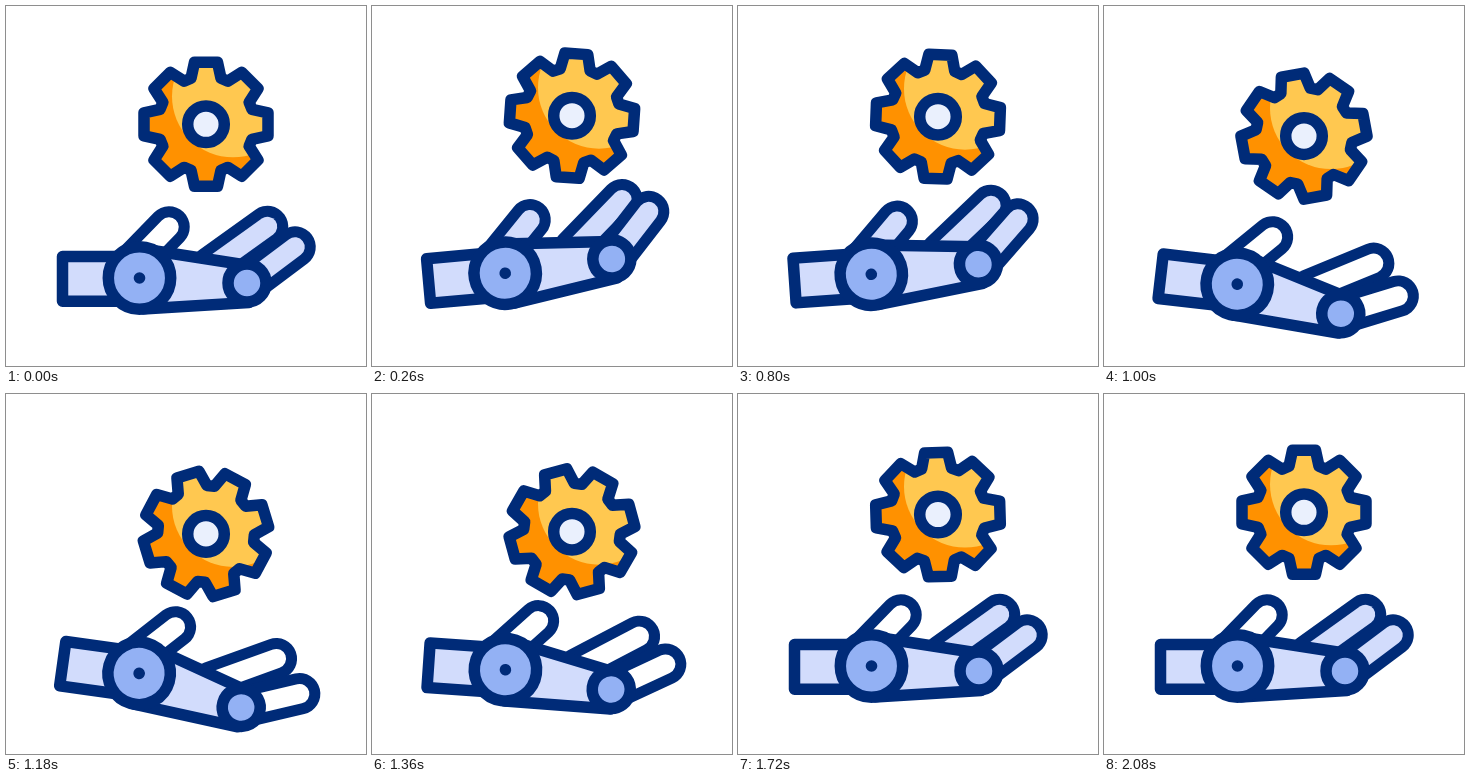
Animation of 360 by 360 pixels, one loop 2100 ms. Source, as an HTML page:

```html
<!DOCTYPE html>
<html lang="en">
<head>
<meta charset="utf-8">
<title>Robot hand and gear</title>
<style>
  html, body { margin: 0; width: 100%; height: 100%; overflow: hidden; background: #fff; }
  svg { display: block; width: 100vw; height: 100vh; }
  .line { stroke: #002b78; stroke-width: 11.5; stroke-linejoin: round; }
  .joint { fill: #93b1f4; }
  .pale { fill: #d2dcfc; }
  .capsule { fill: none; stroke-linecap: round; }
  .edge { stroke: #002b78; stroke-width: 41.5; }
  .core { stroke: #d2dcfc; stroke-width: 19.5; }
</style>
</head>
<body>
<svg viewBox="0 0 360 360" xmlns="http://www.w3.org/2000/svg">
  <defs><clipPath id="gearClip"><path class="gearShape spin"/></clipPath></defs>

  <g id="backFinger" class="capsule">
    <path class="edge" d="M205 261L261.5 220.5"/><path class="core" d="M205 261L261.5 220.5"/>
  </g>

  <!-- The light stays fixed while the outline turns. -->
  <g id="gear">
    <g clip-path="url(#gearClip)">
      <rect x="-70" y="-70" width="140" height="140" fill="#ff9100"/>
      <circle cx="27" cy="-28" r="61" fill="#ffc850"/>
    </g>
    <path class="gearShape spin line" fill="none"/>
    <circle class="line" r="18.3" fill="#eaf0fd"/>
  </g>

  <g id="frontFinger" class="capsule">
    <path class="edge" d="M241 277L289 241"/><path class="core" d="M241 277L289 241"/>
  </g>

  <g id="arm">
    <g id="thumb" class="capsule">
      <path class="edge" d="M128 257L163 221"/><path class="core" d="M128 257L163 221"/>
    </g>
    <path class="line pale" d="M56.5 250.5H125V295.3H56.5Z"/>
  </g>

  <g id="palm">
    <path class="line pale" d="M137 243L243 259.5V296.5L137 303Z"/>
    <circle class="line joint" cx="133.5" cy="272" r="31.2"/>
    <circle cx="133.5" cy="272" r="5.8" fill="#002b78"/>
    <circle class="line joint" cx="241" cy="277" r="19"/>
  </g>
</svg>
<script>
const LOOP = 2100;
const byId = id => document.getElementById(id);
const parts = Object.fromEntries(
  ['arm', 'palm', 'backFinger', 'frontFinger', 'thumb', 'gear'].map(id => [id, byId(id)]));
const cores = Object.fromEntries(
  ['thumb', 'backFinger', 'frontFinger'].map(id => [id, parts[id].querySelector('.core')]));
const spinning = document.querySelectorAll('.spin');

// One tooth outline, repeated around the centre.
function gearPath(teeth = 8) {
  const tooth = [[-15, -46], [-11.5, -62], [11.5, -62], [15, -46]];
  const points = [];
  for (let i = 0; i < teeth; i++) {
    const a = i * 2 * Math.PI / teeth, c = Math.cos(a), s = Math.sin(a);
    for (const [x, y] of tooth) {
      points.push(`${(x * c - y * s).toFixed(2)} ${(x * s + y * c).toFixed(2)}`);
    }
  }
  return 'M' + points.join('L') + 'Z';
}
document.querySelectorAll('.gearShape').forEach(p => p.setAttribute('d', gearPath()));

// Eased value between [time, value] keys.
function track(t, keys) {
  if (t <= keys[0][0]) return keys[0][1];
  for (let i = 1; i < keys.length; i++) {
    const [t0, v0] = keys[i - 1], [t1, v1] = keys[i];
    if (t <= t1) {
      const s = (t - t0) / (t1 - t0);
      return v0 + (v1 - v0) * s * s * (3 - 2 * s);
    }
  }
  return keys[keys.length - 1][1];
}

const BEND = [[70, 0], [540, -14.2], [1100, 8.5], [1600, 0]];
const LIFT = [[30, 118.3], [560, 97], [1200, 140], [1240, 140], [1840, 118.3]];
const SPIN = [[60, 0], [560, 11.2], [1200, -17], [1240, -17], [1840, 0]];

const place = (name, transform) => parts[name].setAttribute('transform', transform);
const tint = (name, white) => { cores[name].style.stroke = white ? '#fff' : '#d2dcfc'; };

function draw(t) {
  const k = track(t, BEND);
  const arm = `rotate(${k} 80 273)`;
  const palm = `${arm} rotate(${k} 133.5 272)`;
  place('arm', arm);
  place('palm', palm);
  place('backFinger', palm);
  place('frontFinger', `${palm} rotate(${k} 241 277)`);
  place('gear', `translate(200 ${track(t, LIFT)})`);
  const turn = `rotate(${track(t, SPIN)})`;
  spinning.forEach(p => p.setAttribute('transform', turn));
  tint('thumb', k > -3);
  tint('backFinger', k > 2);
  tint('frontFinger', k > 2);
}

const start = performance.now();
function tick(now) {
  draw(Math.max(0, now - start) % LOOP);
  requestAnimationFrame(tick);
}
draw(0);
requestAnimationFrame(tick);
</script>
</body>
</html>
```
